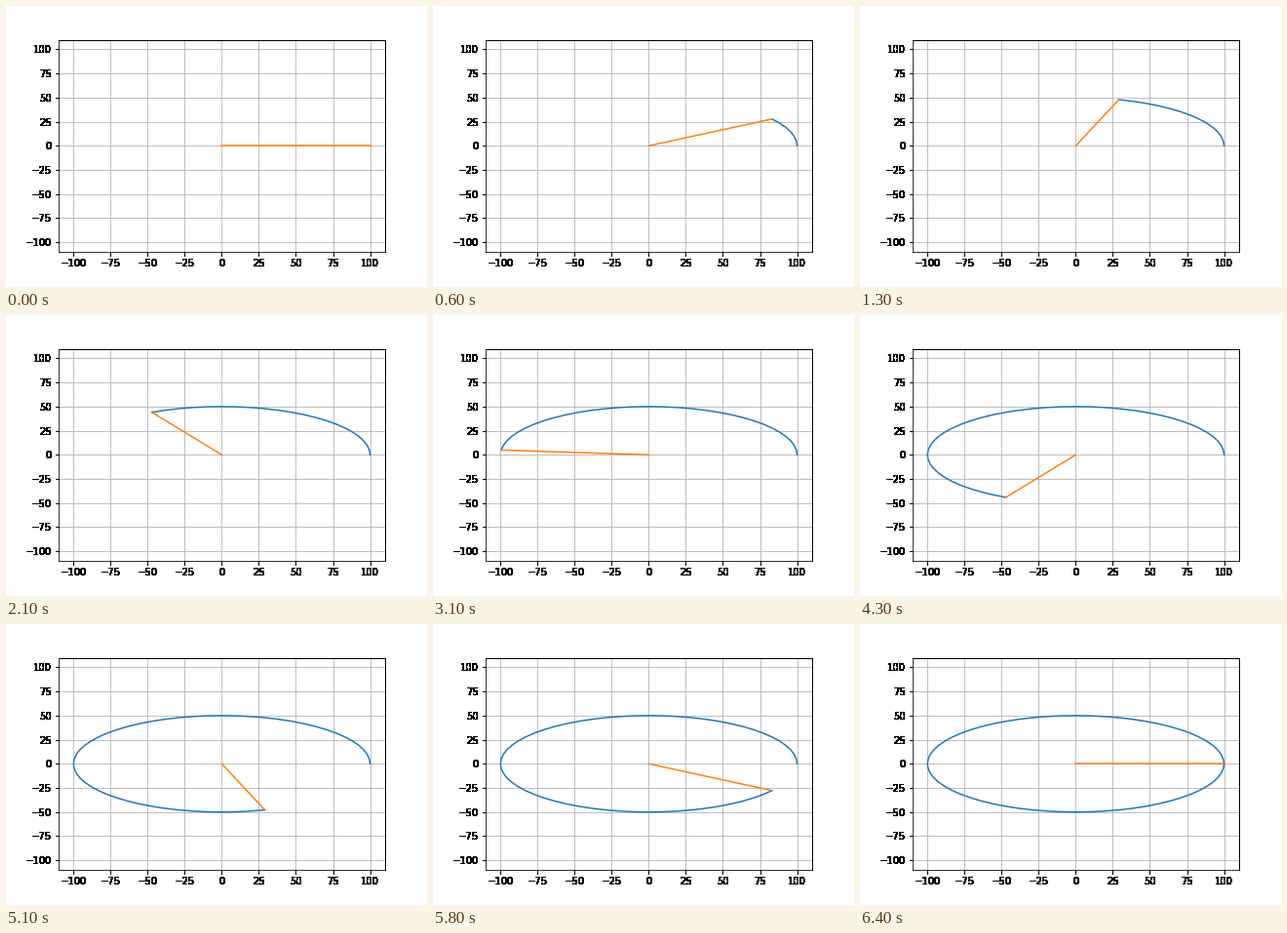
A matplotlib script that plays this animation: 432x288 px, repeating every 6500 ms.

```python
import numpy as np
import matplotlib.pyplot as plt
from matplotlib.animation import FuncAnimation

STEPS = 64
A, B = 100, 50

theta = np.linspace(0, 2 * np.pi, STEPS + 1)
xs, ys = A * np.cos(theta), B * np.sin(theta)


def harden(img, dpi):
    """Make every touched pixel opaque, giving heavy, jagged edges."""
    out = img.copy()
    out[..., 3] = out[..., 3] > 0
    return out, 0, 0


plt.rcParams["font.family"] = "DejaVu Sans"
fig = plt.figure(figsize=(6, 4), dpi=72, facecolor="white")
fig.subplots_adjust(left=0.125, right=0.9, bottom=0.125, top=0.88)
ax = fig.add_subplot()
ticks = np.arange(-100, 101, 25)
ax.set(xlim=(-110, 110), ylim=(-110, 110), xticks=ticks, yticks=ticks)
ax.grid()

for axis in (ax.xaxis, ax.yaxis):
    for tick in axis.get_major_ticks():
        tick.label1.set_agg_filter(harden)
        tick.tick1line.set_agg_filter(harden)
for side in ("right", "top"):
    ax.spines[side].set_agg_filter(harden)

trail, = ax.plot([], [], color="C0", lw=1.5)
radius, = ax.plot([], [], color="C1", lw=1.5)


def update(i):
    trail.set_data(xs[:i + 1], ys[:i + 1])
    radius.set_data([0, xs[i]], [0, ys[i]])
    return trail, radius


anim = FuncAnimation(fig, update, frames=STEPS + 1, interval=100,
                     repeat=True, repeat_delay=0, blit=False)
plt.show()
```
